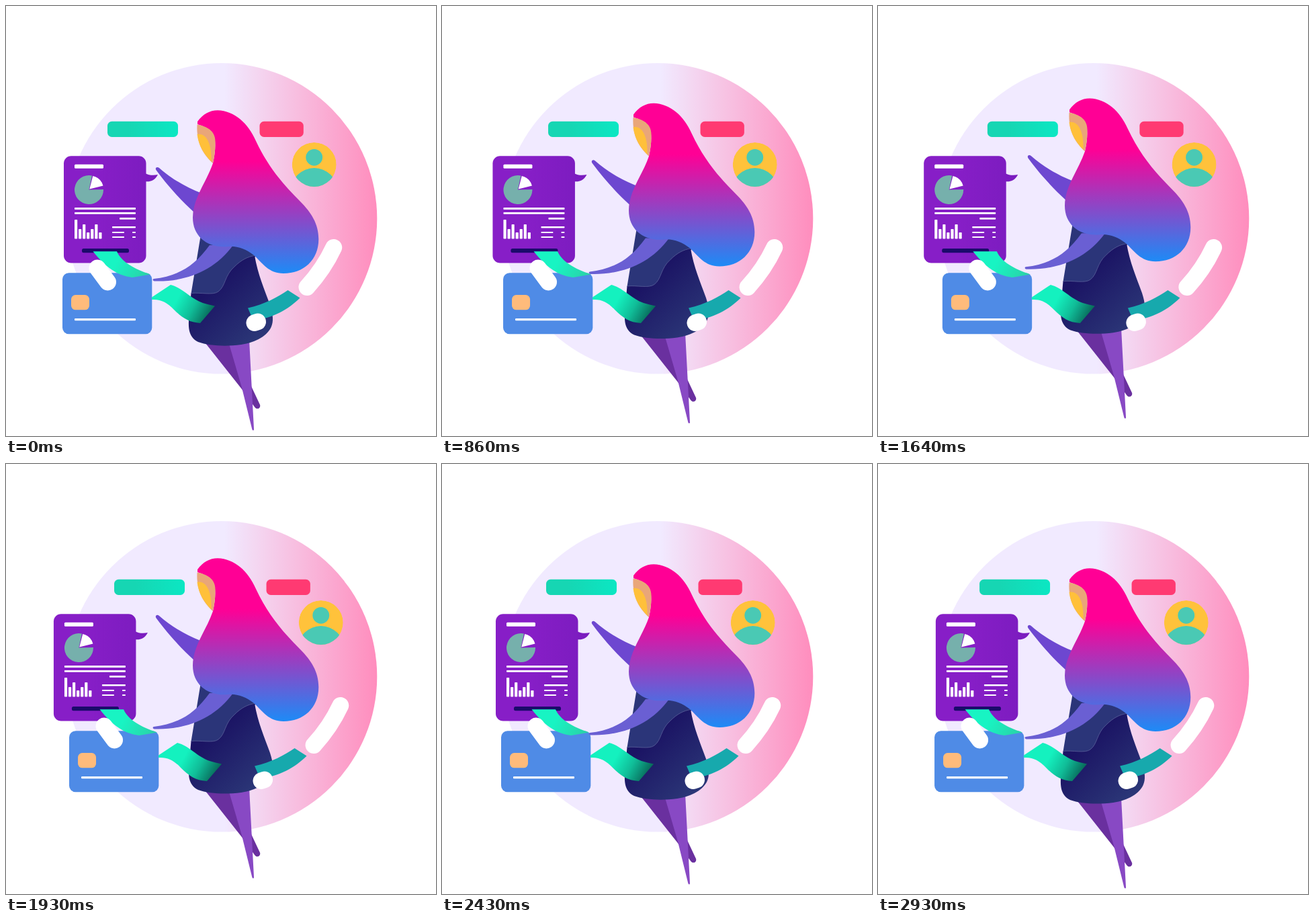
These frames come from a looping animation (640 by 640 pixels, 3 s). An HTML page:

```html
<!DOCTYPE html>
<html lang="en">
<head>
<meta charset="utf-8">
<title>Floating dashboard</title>
<style>
  html, body { margin: 0; width: 100%; height: 100%; overflow: hidden; background: #fff; }
  svg { display: block; width: 100%; height: 100%; }
</style>
</head>
<body>
<svg viewBox="0 0 640 640">
  <defs>
    <linearGradient id="disc" gradientUnits="userSpaceOnUse" x1="325" x2="552">
      <stop stop-color="#f1eaff"/><stop offset="1" stop-color="#ff8dbd"/>
    </linearGradient>
    <linearGradient id="hair" gradientUnits="userSpaceOnUse" x1="0" x2="0" y1="231" y2="396">
      <stop stop-color="#ff0095"/><stop offset="1" stop-color="#2089f5"/>
    </linearGradient>
    <linearGradient id="skirt" gradientUnits="userSpaceOnUse" x1="315" y1="410" x2="385" y2="485">
      <stop stop-color="#1b1464"/><stop offset="1" stop-color="#2b3677"/>
    </linearGradient>
    <linearGradient id="report">
      <stop offset=".4" stop-color="#871ec7"/><stop offset="1" stop-color="#7d1cc0"/>
    </linearGradient>
    <linearGradient id="pill">
      <stop offset=".3" stop-color="#16d6b3"/><stop offset="1" stop-color="#0be7c3"/>
    </linearGradient>
    <linearGradient id="ribbonA" gradientUnits="userSpaceOnUse" x1="165" y1="380" x2="212" y2="405">
      <stop stop-color="#18f4c3"/><stop offset="1" stop-color="#2bd0a6"/>
    </linearGradient>
    <linearGradient id="ribbonB" gradientUnits="userSpaceOnUse" x1="255" y1="436" x2="302" y2="462">
      <stop stop-color="#14f1bf"/><stop offset=".5" stop-color="#10bd98"/><stop offset="1" stop-color="#086a5a"/>
    </linearGradient>
    <clipPath id="badge"><circle cx="458.7" cy="236" r="33"/></clipPath>
  </defs>

  <circle cx="321" cy="316.3" r="231.3" fill="url(#disc)"/>

  <g class="drift">
    <rect x="151" y="171.8" width="105" height="23.2" rx="6.5" fill="url(#pill)"/>
    <rect x="377.5" y="171.8" width="65.3" height="23.2" rx="6.5" fill="#ff3a72"/>
    <g clip-path="url(#badge)">
      <circle cx="458.7" cy="236" r="33" fill="#ffc23b"/>
      <g fill="#4ac9b4">
        <circle cx="458.7" cy="225.3" r="12.4"/>
        <circle cx="458.7" cy="275.5" r="34.5"/>
      </g>
    </g>
  </g>

  <g id="sheet">
    <path fill="#7b1cbf" d="M207 249C213 252 219 252.500 226 251C222 259 215 262.500 207 261Z"/>
    <rect x="86" y="223.200" width="122.500" height="159.300" rx="11" fill="url(#report)"/>
    <path fill="#76b0ac" d="M123.500 273.500L145 273A21.500 21.500 0 1 1 128 252.500Z"/>
    <g fill="#fff">
      <rect x="102" y="235.700" width="43" height="6" rx="1.500"/>
      <path d="M124.300 272.500L129.300 253A20.500 20.500 0 0 1 144.500 267.500Z"/>
      <g id="lines"></g>
      <g id="bars"></g>
    </g>
    <rect x="113" y="361" width="70" height="6.300" rx="2.500" fill="#1b0a6b"/>
  </g>

  <g class="drift">
    <rect x="84" y="397.300" width="133.300" height="91" rx="9.500" fill="#4f8be6"/>
    <rect x="97" y="430" width="27" height="22.300" rx="6.500" fill="#ffbb7b"/>
    <rect x="102" y="465" width="91" height="3.200" rx="1" fill="#fff"/>
  </g>

  <g id="woman">
    <path fill="#6d47d0" d="M228 241C246 257 268 270 292 279L281 308C260 289 241 268 223.300 244C221.500 240.500 225 238.500 228 241Z"/>
    <path fill="#6a309f" d="M297 502H334L366 568L378 593.500C379.500 598.500 374 601.500 370.500 597.500L350 569Z"/>
    <path fill="#8849c4" d="M332 503L362 497L369 630C369 632.300 367 632.300 366.300 630L351 568Z"/>
    <path fill="#2b3579" d="M290 340L275.500 428L320 432L371 373L366 345Z"/>
    <path fill="url(#skirt)" d="M275.500 427.500C290 426 308 431 316 425C327 417 325 401 340 388C350 378 360 373 370 371.500C375 400 384 420 393 445C398 460 398 470 395 477C390 490 372 501 350 504C328 507 302 506 286 500C270 492 271 476 273 456Z"/>
    <path fill="none" stroke="#62679f" stroke-width=".7" d="M275.500 427.500C290 426 308 431 316 425C327 417 325 401 340 388C350 378 360 373 370 371.500"/>
    <path fill="#6a5fd3" d="M220 406C255 402 280 388 303 356H338C310 395 265 411 221 409.500C218 409 218 406.500 220 406Z"/>
    <path fill="url(#hair)" d="M285 172C293 161 303 155.300 315 155.300C340 156 360 174 372 201C390 239 411 264 438 291C454 307 465.300 324 465.300 347C465.300 378 443 398 413 398C391 398 382 383 369 371C357 362 345 357 331 358C300 361 278 343 278 315C278 286 299 261 308 234C313 212 312 197 308 190C303 182 294 179 285 176Z"/>
    <path fill="#e9a679" d="M284.500 176.500C298 179 311.500 185 311.500 202C311.500 216 310 226 307.700 234C295 222 283 206 284.500 176.500Z"/>
    <path fill="#ffc03a" d="M284.500 191C298 188 306.500 205 305.500 231.500C295 221 287 209 284.500 191Z"/>
  </g>

  <g class="drift">
    <path fill="url(#ribbonA)" d="M129.500 365.300H165C172 381 190 391 215 399.500L188 404C165 401 148 389 129.500 365.300Z"/>
    <path fill="url(#ribbonB)" d="M217 433.500L245 415C262 419 275 436 293 442C299 444 305 445 311 446.500L289 472C272 471 262 464 250 452C240 441 230 436 217 437Z"/>
    <path fill="#17a9ad" d="M360 449.500C385 444 405 433 419.500 423L437.500 434.500C420 452 396 465 368 468Z"/>
    <g fill="none" stroke="#fff" stroke-width="25" stroke-linecap="round">
      <path d="M136 390L151.500 411"/>
      <path d="M370 471.500L374.500 470"/>
      <path d="M487.700 359.500Q473 391 448 418.500"/>
    </g>
  </g>
</svg>
<script>
  const byId = id => document.getElementById(id);
  const rect = (x, y, w, h) => `<rect x="${x}" y="${y}" width="${w}" height="${h}" rx=".8"/>`;

  byId('bars').innerHTML = [28.5, 14.5, 21.5, 9.5, 14.5, 21.5, 9.5]
    .map((h, i) => rect(102 + i * 6.05, 346.5 - h, 4.2, h)).join('');
  byId('lines').innerHTML =
    rect(102, 300, 91, 3) + rect(102, 306.9, 91, 2.8) + rect(169, 315, 24, 2.8) + rect(158, 328, 35, 2.6) +
    [336, 343].map(y => rect(158, y, 18, 2.1) + rect(188, y, 5, 2.1)).join('');

  const LOOP = 3000, FPS = 14, STEPS = 42, PEAK = 21.6;
  const drifters = document.querySelectorAll('.drift');
  const ease = p => (1 - Math.cos(Math.PI * p)) / 2;
  const move = (el, x, y) => el.setAttribute('transform', `translate(${x} ${y})`);

  function draw(time) {
    // Stepped at 14 poses per second; delays round to 10 ms.
    const step = Math.floor((time % LOOP + 5) * FPS / 1000) % STEPS;
    const k = step < PEAK ? ease(step / PEAK) : ease((STEPS - step) / (STEPS - PEAK));
    move(byId('sheet'), -18 * k, 0);
    move(byId('woman'), 0, -18 * k);
    drifters.forEach(el => move(el, 12 * k, 0));
  }

  const start = performance.now();
  function tick() {
    draw(performance.now() - start);
    requestAnimationFrame(tick);
  }
  tick();
</script>
</body>
</html>
```
